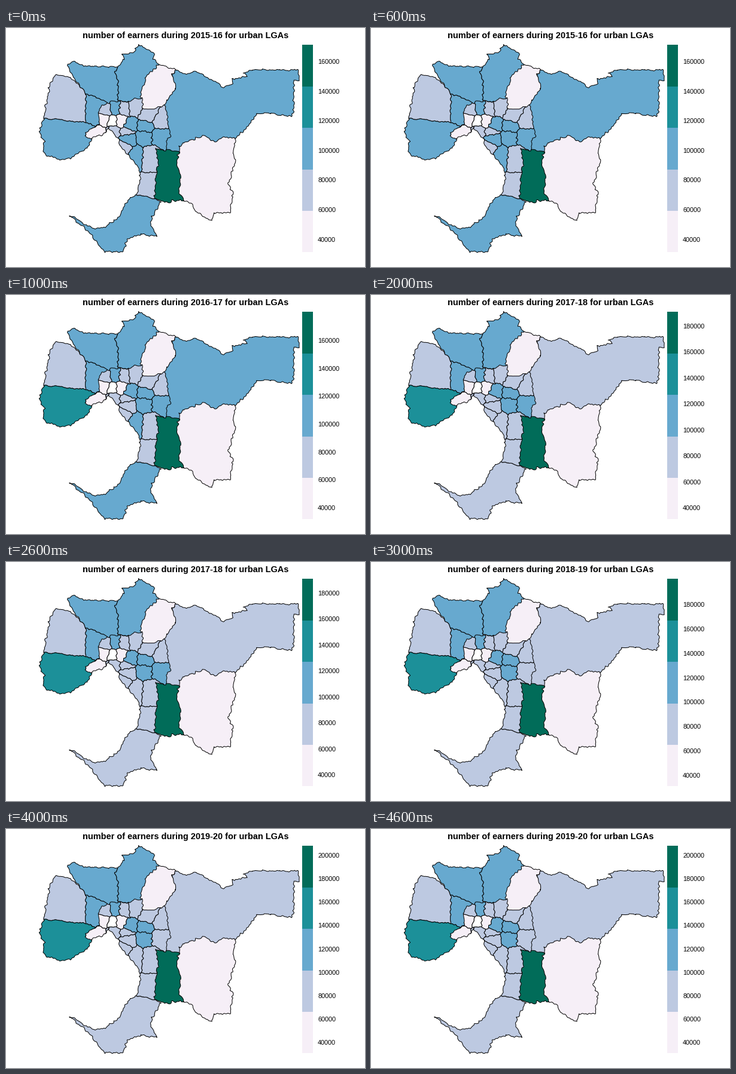
A matplotlib script for the animation above (5 s loop, 600 by 400 pixels).

```python
import numpy as np
import matplotlib.pyplot as plt
from matplotlib.animation import FuncAnimation
from matplotlib.patches import Polygon, Rectangle

W, H, DPI = 600, 400, 100
PX = 72 / DPI
PALETTE = ["#F6EFF7", "#BDC9E1", "#67A9CF", "#1C9099", "#016C59", "white"]
NO_DATA = "55555"
BAR_TOP, BAR_BOTTOM = 27.9, 374.9
# lowest and highest value of the scale in each year, in thousands
RANGES = [(31.2, 171.2), (31.6, 180.5), (31.3, 190.7), (30.9, 201.0), (30.7, 207.9)]

plt.rcParams["font.family"] = "Liberation Sans"
fig = plt.figure(figsize=(W / DPI, H / DPI), dpi=DPI, facecolor="white")
ax = fig.add_axes([0, 0, 1, 1])
ax.set_xlim(-0.5, W - 0.5)
ax.set_ylim(H - 0.5, -0.5)
ax.axis("off")

# random plane waves: a fixed field, so touching borders wiggle alike
rng = np.random.default_rng(7)
angle = rng.uniform(0, 2 * np.pi, 10)
waves = np.array([np.cos(angle), np.sin(angle)]) * rng.uniform(0.4, 1.1, 10)
phase = rng.uniform(0, 2 * np.pi, (2, 10))


def wiggle(pts):
    """Closed outline through pts with natural looking edges."""
    pts = np.array(pts, float)
    line = []
    for p, q in zip(pts, np.roll(pts, -1, axis=0)):
        n = int(np.hypot(*(q - p)) / 1.5) + 1
        line.extend(p + (q - p) * k / n for k in range(n))
    line = np.array(line)
    shift = [np.sin(line @ waves + ph).sum(axis=1) for ph in phase]
    return line + 0.33 * np.transpose(shift)


areas = []  # (patch, colour class for each year)


def area(classes, *pts):
    patch = ax.add_patch(Polygon(wiggle(pts), ec="black", lw=PX, joinstyle="round"))
    areas.append((patch, classes))
    return patch


def cell(center, others, box):
    """Part of box that is nearer to center than to any other point."""
    poly, c = [np.array(p, float) for p in box], np.array(center)
    for o in others:
        if o == center:
            continue
        normal, mid = np.array(o) - c, (np.array(o) + c) / 2
        out = []
        for p, q in zip(poly, poly[1:] + poly[:1]):
            dp, dq = (p - mid) @ normal, (q - mid) @ normal
            if dp <= 0:
                out.append(p)
            if dp * dq < 0:
                out.append(p + (q - p) * dp / (dp - dq))
        poly = out
    return poly


# Outer areas, back to front: later ones cover the hidden corners of earlier ones.
# Yarra Ranges
area("22111", (282, 69), (300, 77), (318, 72), (333, 81), (350, 90), (362, 99),
     (379, 92), (377, 85), (402, 80), (397, 74), (413, 69), (488, 70), (489, 87),
     (481, 87), (480, 140), (476, 148), (447, 143), (420, 142), (400, 168),
     (383, 183), (340, 200), (289, 207), (260, 205), (262, 130))
# Cardinia
area("00000", (289, 197), (303, 189), (331, 179), (348, 190), (360, 183),
     (383, 183), (379, 210), (383, 221), (371, 262), (379, 277), (374, 308),
     (348, 309), (343, 322), (316, 307), (311, 294), (298, 289), (275, 270),
     (275, 207), (289, 207))
# Mornington Peninsula
area("22111", (218, 278), (208, 283), (197, 296), (190, 315), (164, 333),
     (145, 335), (125, 324), (106, 314), (138, 341), (164, 374), (195, 374),
     (203, 352), (226, 345), (251, 347), (242, 330), (242, 320), (258, 290),
     (247, 285))
# Casey
area("44444", (248, 200), (289, 207), (285, 225), (292, 250), (288, 275),
     (298, 289), (277, 287), (273, 293), (247, 285), (245, 240))
# Hume
area("22222", (112, 82), (102, 62), (111, 55), (130, 63), (186, 65), (182, 75),
     (187, 90), (187, 121), (177, 130), (157, 118), (133, 109), (124, 97))
# Whittlesea
area("22222", (186, 65), (197, 51), (193, 44), (213, 40), (220, 28), (247, 41),
     (246, 52), (255, 60), (240, 95), (226, 125), (187, 121), (187, 90), (182, 75))
# Nillumbik
area("00000", (255, 60), (284, 69), (277, 77), (284, 100), (269, 120), (262, 131),
     (246, 140), (226, 135), (224, 108), (232, 90), (232, 82), (250, 66))
# Melton
area("11111", (63, 150), (72, 96), (83, 76), (107, 82), (124, 97), (133, 109),
     (132, 158))
# Brimbank
area("22222", (133, 109), (157, 118), (175, 128), (160, 158), (149, 164), (132, 158))
# Wyndham
area("23333", (63, 150), (132, 158), (149, 164), (131, 178), (144, 184),
     (135, 200), (108, 217), (92, 220), (66, 212), (61, 204), (64, 190),
     (55, 176), (57, 166))

# Inner areas: nearest-centre cells, cut to the outline of the inner city.
inner = Polygon(wiggle([
    (154, 138), (160, 129), (177, 122), (206, 123), (214, 117), (227, 118),
    (228, 134), (246, 135), (266, 128), (269, 146), (271, 168), (275, 178),
    (268, 188), (267, 205), (250, 200), (254, 226), (251, 242), (247, 285),
    (218, 278), (224, 252), (222, 235), (206, 215), (190, 196), (187, 185),
    (171, 165), (165, 176), (144, 183), (134, 183), (131, 177), (140, 169),
    (156, 161), (154, 150)]), fill=False, ec="black", lw=PX, joinstyle="round")

CENTERS = {
    (167, 136): "11111",  # Moonee Valley
    (182, 134): "22222",  # Moreland
    (196, 135): "11111",  # Darebin
    (214, 133): "11111",  # Banyule
    (154, 172): "00000",  # Hobsons Bay
    (163, 153): "00000",  # Maribyrnong
    (178, 157): NO_DATA,  # Melbourne
    (191, 156): "00000",  # Yarra
    (206, 163): "22222",  # Boroondara
    (236, 145): "11111",  # Manningham
    (259, 157): "11111",  # Maroondah
    (232, 166): "22222",  # Whitehorse
    (202, 173): "11111",  # Stonnington
    (178, 172): "11111",  # Port Phillip
    (204, 184): "21111",  # Glen Eira
    (197, 200): "11111",  # Bayside
    (229, 181): "22222",  # Monash
    (257, 179): "22211",  # Knox
    (217, 212): "22111",  # Kingston
    (239, 214): "11111",  # Greater Dandenong
    (237, 268): "11111",  # Frankston
}
ax.add_patch(inner)
BOX = [(110, 90), (300, 90), (300, 310), (110, 310)]
for center, classes in CENTERS.items():
    area(classes, *cell(center, CENTERS, BOX)).set_clip_path(inner)
inner.set_zorder(2)

step = (BAR_BOTTOM - BAR_TOP) / 5
for k, color in enumerate(PALETTE[:5]):
    ax.add_patch(Rectangle((494.5, BAR_BOTTOM - (k + 1) * step), 18, step,
                           fc=color, lw=0, antialiased=False))

title = ax.text(299.5, 17, "", size=14.56 * PX, weight="bold", ha="center",
                va="baseline")
labels = {v: ax.text(520.5, 0, f"{v}000", size=10.9 * PX, va="baseline")
          for v in range(40, 201, 20)}


def draw(i):
    title.set_text(f"number of earners during {2015 + i}-{16 + i} for urban LGAs")
    for patch, classes in areas:
        patch.set_facecolor(PALETTE[int(classes[i])])
    low, high = RANGES[i]
    for value, label in labels.items():
        y = BAR_BOTTOM - (value - low) / (high - low) * (BAR_BOTTOM - BAR_TOP)
        label.set_y(y + 4)
        label.set_visible(y > BAR_TOP + 6)  # no label at the very top
    return [title]


anim = FuncAnimation(fig, draw, frames=len(RANGES), interval=1000, repeat=True,
                     repeat_delay=0, blit=False)
plt.show()
```
